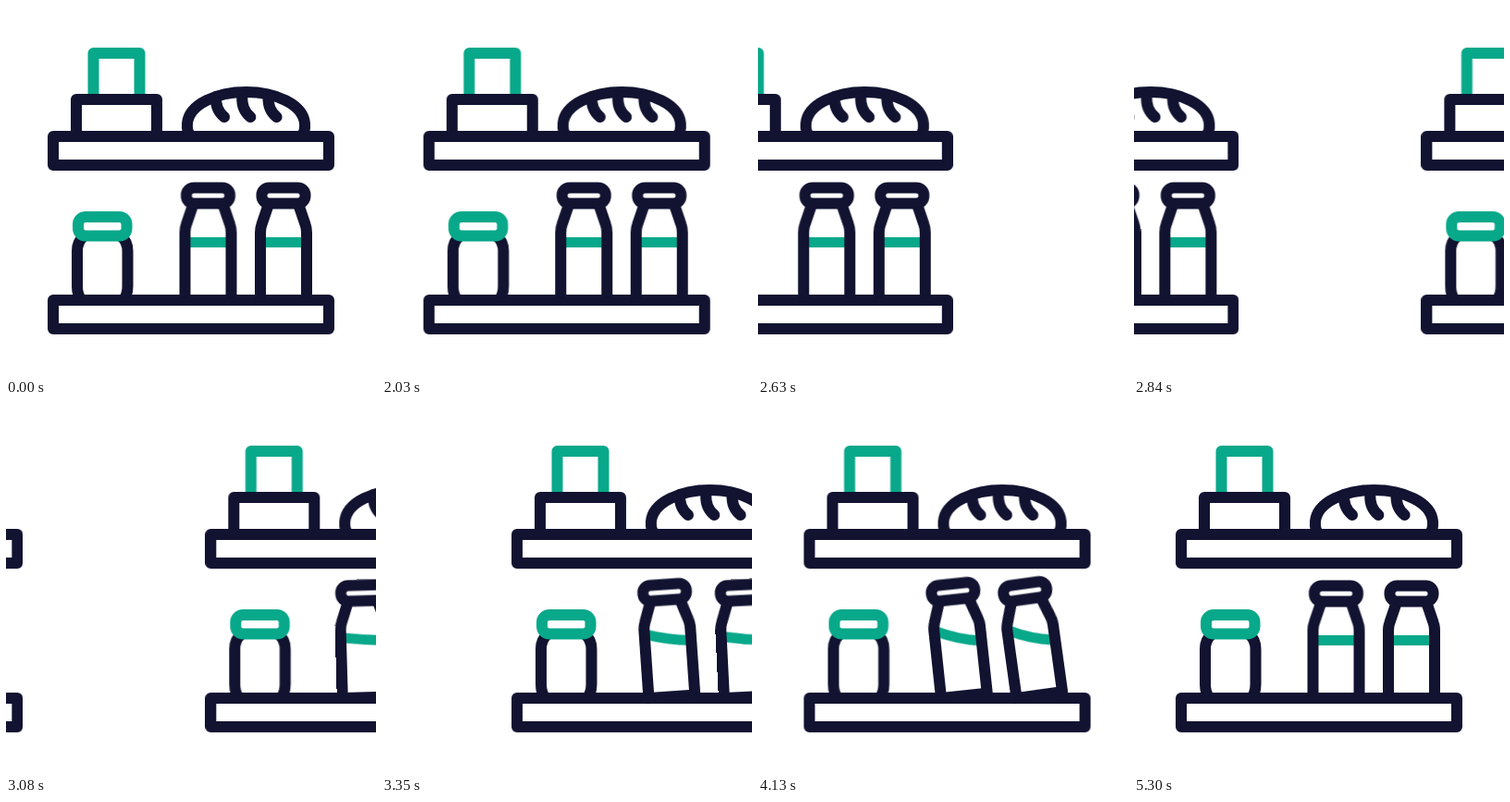
An HTML page without scripts for the animation above (5.33 s loop, 400 by 400 pixels).

```html
<!DOCTYPE html>
<html lang="en">
<head>
<meta charset="utf-8">
<title>Pantry shelves</title>
<style>
  :root { --loop: 5330ms; --ink: #121331; --green: #08a88a; }
  html, body { margin: 0; width: 100%; height: 100%; overflow: hidden; background: #fff; }
  svg { display: block; width: 100%; height: 100%; }

  .ink, .green { fill: none; stroke-width: 12; stroke-linejoin: round; }
  .ink { stroke: var(--ink); }
  .green { stroke: var(--green); }

  .belt { animation: slide var(--loop) infinite; }
  .bottle { animation: tilt-first var(--loop) infinite; transform-origin: 0 0; }
  .liquid { stroke-width: 11; animation: slosh var(--loop) infinite; }
  .second { animation-name: tilt-second; }
  .second, .second .liquid { animation-delay: 170ms; }

  @keyframes slide {
    0% { transform: translateX(0); }
    37.52% { transform: translateX(0); animation-timing-function: cubic-bezier(.333, 0, .3, 1); }
    82.46%, 100% { transform: translateX(-507px); }
  }
  @keyframes tilt-first {
    0% { transform: rotate(0deg); }
    50.66% { transform: rotate(0deg); animation-timing-function: cubic-bezier(.333, 0, .667, 1); }
    73.17% { transform: rotate(-7deg); animation-timing-function: cubic-bezier(.333, 0, .667, 1); }
    92.31%, 100% { transform: rotate(0deg); }
  }
  @keyframes tilt-second {
    0% { transform: rotate(0deg); }
    50.66% { transform: rotate(0deg); animation-timing-function: cubic-bezier(.333, 0, .667, 1); }
    73.17% { transform: rotate(-8deg); animation-timing-function: cubic-bezier(.333, 0, .667, 1); }
    92.31%, 100% { transform: rotate(0deg); }
  }
  @keyframes slosh {
    0% { d: path("M0 -62.5Q25 -62.5 50 -62.5"); }
    50.66% { d: path("M0 -62.5Q25 -62.5 50 -62.5"); animation-timing-function: cubic-bezier(.333, 0, .667, 1); }
    73.17% { d: path("M0 -74.5Q25 -60.5 50 -56.5"); animation-timing-function: cubic-bezier(.333, 0, .667, 1); }
    96.25%, 100% { d: path("M0 -62.5Q25 -62.5 50 -62.5"); }
  }
</style>
</head>
<body>
<svg viewBox="0 0 400 400">
  <defs>
    <!-- Origin is the lower left corner, the point the bottle tips on -->
    <g id="glass" class="ink">
      <path d="M9 -104L1.5 -82Q0 -78 0 -73V0H50V-73Q50 -78 48.5 -82L41 -104"/>
      <rect x="1.5" y="-121.5" width="47" height="17" rx="8"/>
    </g>

    <path id="slash" class="ink" stroke-linecap="round" d="M227 98C226.5 107 228.5 114 236 120"/>

    <g id="shelves">
      <path class="green" d="M94.5 97V51H144.5V97"/>
      <path class="ink" d="M76 141V101H163V141"/>

      <path class="ink" d="M200 141C196 137 195.5 132 196 127C198 106 228 93 259.5 93S321 106 323 127C323.5 132 323 137 319 141"/>
      <use href="#slash"/>
      <use href="#slash" x="28.3"/>
      <use href="#slash" x="56.6"/>

      <path class="ink" d="M84 249C79 253 77 258 77 265V303C77 310 79 315 82 318M124.5 249C129.5 253 131.5 258 131.5 265V303C131.5 310 129.5 315 126.5 318"/>
      <rect class="green" x="78" y="228" width="52.5" height="20.5" rx="8"/>

      <rect class="ink" x="51" y="141" width="298" height="31"/>
      <rect class="ink" x="51" y="318" width="298" height="31"/>
    </g>
  </defs>

  <g class="belt">
    <g>
      <use href="#shelves"/>
      <g transform="translate(193.5 318)">
        <g class="bottle"><path class="green liquid" d="M0 -62.5Q25 -62.5 50 -62.5"/><use href="#glass"/></g>
      </g>
      <g transform="translate(275 318)">
        <g class="bottle second"><path class="green liquid" d="M0 -62.5Q25 -62.5 50 -62.5"/><use href="#glass"/></g>
      </g>
    </g>
    <g transform="translate(507 0)">
      <use href="#shelves"/>
      <g transform="translate(193.5 318)">
        <g class="bottle"><path class="green liquid" d="M0 -62.5Q25 -62.5 50 -62.5"/><use href="#glass"/></g>
      </g>
      <g transform="translate(275 318)">
        <g class="bottle second"><path class="green liquid" d="M0 -62.5Q25 -62.5 50 -62.5"/><use href="#glass"/></g>
      </g>
    </g>
  </g>
</svg>
</body>
</html>
```
